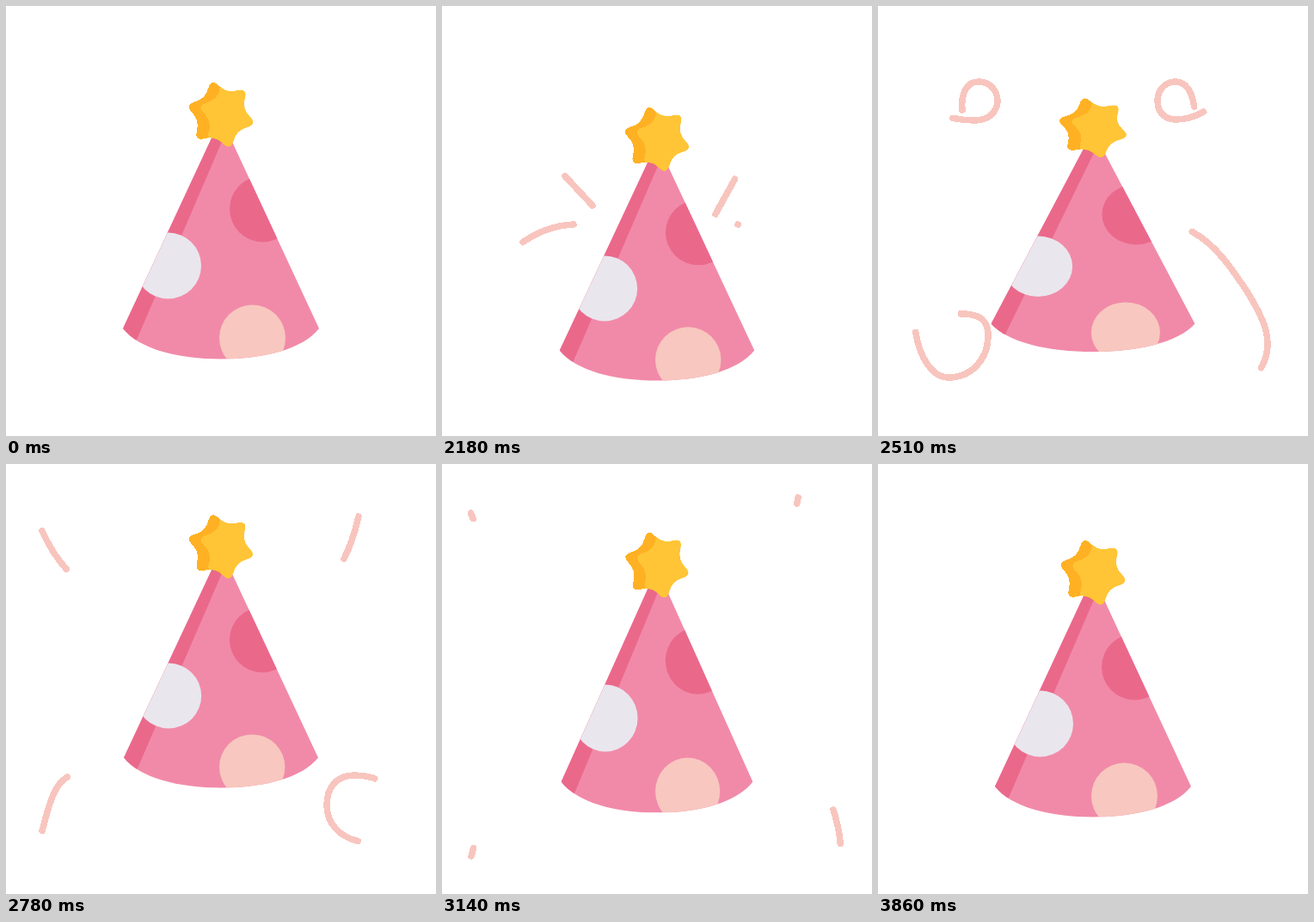
Write an HTML page that moves like this. It is 500 px wide and 500 px high and loops after 3.89 s.

```html
<!DOCTYPE html>
<html lang="en">
<head>
<meta charset="utf-8">
<title>Party hat</title>
<style>
  html, body { margin: 0; width: 100%; height: 100%; overflow: hidden; background: #fff; }
  svg { display: block; width: 100%; height: 100%; }
  #cone, #star, #streamers { shape-rendering: crispEdges; }
</style>
</head>
<body>
<svg viewBox="0 0 500 500">
  <defs>
    <path id="cone" d="M250 130L136 375C155 399 200 410.5 250 410.5S345 399 364 375Z"/>
    <path id="star"/>
    <clipPath id="inCone"><use href="#cone"/></clipPath>
    <clipPath id="inStar"><use href="#star"/></clipPath>
  </defs>
  <g id="streamers" fill="none" stroke="#f8c5be" stroke-width="7.5" stroke-linecap="round">
    <path pathLength="1" d="M175 232L146 201C125 178 104 152 99 128C95 108 100 88 117 88C131 88 139 99 139 111C138 124 128 133 113 133C104 133 94 132 85 130C79 128 74 126 70 122C58 109 49 93 42 78L33.500 57"/>
    <path pathLength="1" d="M318 242L339 204C352 180 371 150 368 122C367 104 360 88 346 88C333 88 325 99 325 110C325 124 334 132 346 132C359 132 371 128 382 121C387 118 391 114 393 110C401 95 406 78 410 61L414 39"/>
    <path pathLength="1" d="M153 254C132 255 115 261 98 272C65 293 42 330 43 373C46 405 62 432 82 432C108 432 127 412 128 385C129 365 118 357 93 358C83 358 76 360 70 365C57 372 50 395 42 427L34 456"/>
    <path pathLength="1" d="M344 254C352 255 360 258 366 263C393 277 414 309 431 335C446 360 462 388 447 418C440 432 427 441 411 439C388 434 373 418 373 397C373 375 385 362 405 362C413 362 420 363 427 365C442 372 450 386 454 399C459 414 462 427 463 439L464 456"/>
  </g>
  <g id="hat">
    <g clip-path="url(#inCone)">
      <path d="M120 120H380V420H120Z" fill="#f18aa8"/>
      <path d="M263 130L152 388L120 400V130Z" fill="#ea698b"/>
      <circle cx="298.5" cy="236" r="38.500" fill="#ea698b"/>
      <circle cx="188.5" cy="302" r="38.500" fill="#eae6ed"/>
      <circle cx="286.5" cy="386" r="38.500" fill="#f8c7bf"/>
    </g>
    <use href="#star" fill="#ffb123"/>
    <g clip-path="url(#inStar)" fill="#ffc536">
      <use href="#star" x="14" y="1"/>
      <path d="M249 80H300V170H246Z"/>
    </g>
  </g>
</svg>
<script>
const LOOP = 3890, START = 2030, STEP = 30, MID = 268.5;
const $ = id => document.getElementById(id);

// Rounded six-pointed star: curves between edge midpoints, bent around each corner.
function starPath(cx, cy, outer, inner, turn) {
  const corner = i => {
    const r = i % 2 ? inner : outer, a = (turn + i * 30) * Math.PI / 180;
    return [cx + r * Math.cos(a), cy + r * Math.sin(a)];
  };
  const mid = i => corner(i).map((v, k) => (v + corner(i + 1)[k]) / 2);
  let d = "M" + mid(-1);
  for (let i = 0; i < 12; i++) d += `Q${corner(i)} ${mid(i)}`;
  return d + "Z";
}
$("star").setAttribute("d", starPath(249.8, 126.2, 44, 25.5, 15));

// Keys are [time, value], joined by sine easing.
function track(keys, t) {
  if (t <= keys[0][0]) return keys[0][1];
  for (let i = 1; i < keys.length; i++) {
    const [t0, a] = keys[i - 1], [t1, b] = keys[i];
    if (t < t1) return a + (b - a) * (1 - Math.cos(Math.PI * (t - t0) / (t1 - t0))) / 2;
  }
  return keys[keys.length - 1][1];
}

// cubic-bezier(.3, 0, .18, 1)
function ease(x) {
  if (x <= 0) return 0;
  if (x >= 1) return 1;
  let lo = 0, hi = 1;
  for (let i = 0; i < 24; i++) {
    const s = (lo + hi) / 2, r = 1 - s;
    if (0.9 * r * r * s + 0.54 * r * s * s + s * s * s < x) lo = s; else hi = s;
  }
  return lo * lo * (3 - 2 * lo);
}

const shift = [[2010, 0], [2260, 35], [2780, -32], [3300, 0]];
const scaleX = [[2000, 1], [2080, 0.985], [2480, 1.04], [2960, 0.97], [3560, 1.003], [3860, 1]];
const scaleY = [[2010, 1], [2050, 1.006], [2480, 0.915], [2960, 1.018], [3500, 0.996], [3860, 1]];

const early = { head: 2010, tail: 2230, span: 1115 };
const late = { head: 2162, tail: 2385, span: 1260 };
const streamers = [...$("streamers").children].map((path, i) => ({ path, time: i < 3 ? early : late }));

function draw(t) {
  const y = MID + track(shift, t);
  $("hat").setAttribute("transform",
    `translate(250 ${y}) scale(${track(scaleX, t)} ${track(scaleY, t)}) translate(-250 ${-MID})`);
  for (const { path, time } of streamers) {
    const head = ease((t - time.head) / time.span), tail = ease((t - time.tail) / time.span);
    path.style.display = head > 0 && tail < 1 ? "" : "none";
    path.setAttribute("stroke-dasharray", `${Math.max(head - tail, 0.0005)} 2`);
    path.setAttribute("stroke-dashoffset", -tail);
  }
}

const begin = performance.now();
function frame() {
  const t = (performance.now() - begin) % LOOP;
  draw(t < START ? 0 : START + Math.floor((t - START) / STEP) * STEP);
  requestAnimationFrame(frame);
}
frame();
</script>
</body>
</html>
```
